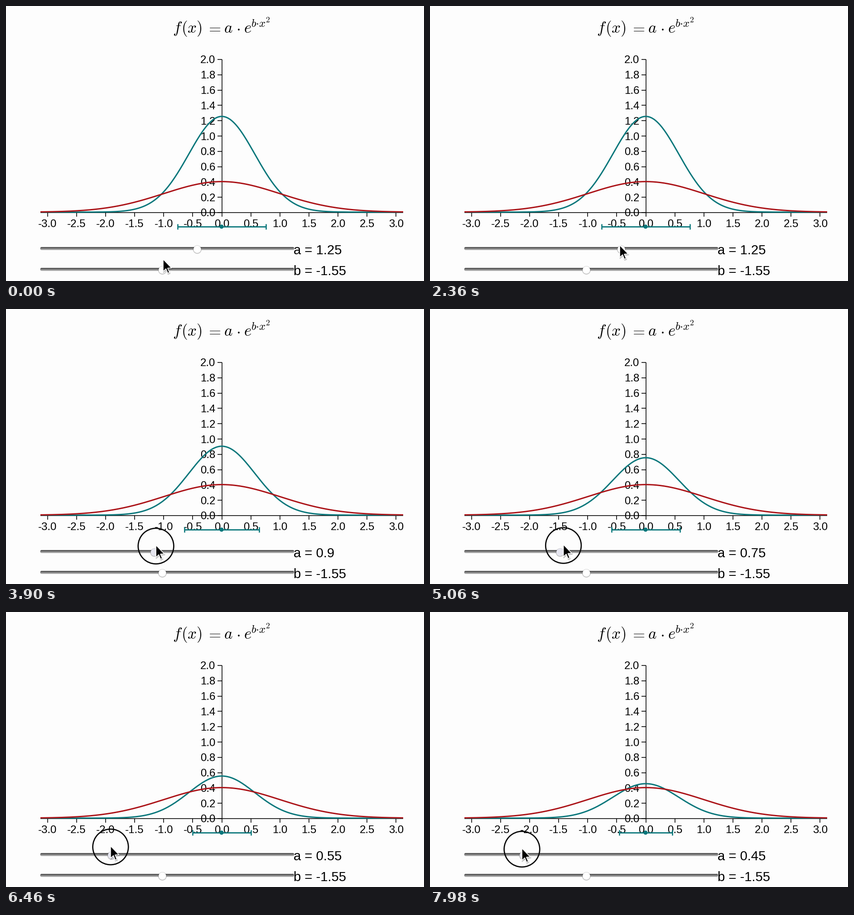
Write a matplotlib script that moves like this. It is 923x607 px and loops after 8 s.

```python
import numpy as np
import matplotlib.pyplot as plt
from matplotlib.animation import FuncAnimation
from matplotlib.patches import Circle, FancyBboxPatch, Polygon, Rectangle

W, H, DPI = 923, 607, 64
PX = 72 / DPI            # points per pixel
STEP, LOOP = 40, 8000
TEAL, RED, INK = "#0a777b", "#ab1318", "#000000"
X0, XU = 476.5, 128.33   # plot origin and pixels per unit
Y0, YU = 456, 169
LEFT, RIGHT = 76, 877
B = -1.55

plt.rcParams["font.family"] = "Liberation Sans"
plt.rcParams["mathtext.fontset"] = "cm"

fig = plt.figure(figsize=(W / DPI, H / DPI), dpi=DPI, facecolor="#fdfdfd")
ax = fig.add_axes([0, 0, 1, 1])
ax.set_xlim(0, W)
ax.set_ylim(H, 0)
ax.axis("off")


def line(x, y, width=1.6, color=INK, z=2):
    return ax.plot(x, y, color=color, lw=width * PX, zorder=z,
                   solid_capstyle="butt")[0]


def text(x, y, s, size, ha="left", z=1):
    return ax.text(x, y, s, fontsize=size * PX, ha=ha, va="baseline",
                   color=INK, zorder=z)


def curve_y(a, b):
    return Y0 - 1 - YU * a * np.exp(b * xs ** 2)


# Formula
for x, y, s, size, ha in [
        (368, 59, "f", 35, "left"), (387.2, 59, "(x)", 35, "left"),
        (457.8, 59, "=", 35, "center"), (481.2, 59, "a", 35, "left"),
        (512.4, 59, r"\cdot", 35, "center"), (525, 59, "e", 35, "left"),
        (541.3, 46, r"b{\cdot}x", 24.7, "left"), (573, 36, "2", 17.5, "left")]:
    text(x, y, f"${s}$", size, ha)

# Axes
plot_area = Rectangle((LEFT, 0), RIGHT - LEFT, H, transform=ax.transData)
line([LEFT, RIGHT], [Y0, Y0])
line([X0, X0], [Y0 - 2 * YU, Y0])
for k in range(-6, 7):
    x = X0 + k / 2 * XU
    line([x, x], [Y0, Y0 + 9])
    label = text(x, 488, f"{k / 2:.1f}", 24, "center")
    label.set_clip_path(plot_area)
for k in range(11):
    y = Y0 - k / 5 * YU
    line([X0 - 9.5, X0], [y, y])
    text(462.5, y + 8.5, f"{k / 5:.1f}", 24, "right")

# Curves and spread bar
px = np.linspace(LEFT, RIGHT, 401)
xs = (px - X0) / XU
bell = line(px, curve_y(1.25, B), 3, TEAL, 3)
line(px, curve_y(1 / np.sqrt(2 * np.pi), -0.5), 3, RED, 4)
bar = line([], [], 2.8, TEAL, 3)
caps = [line([], [], 2.6, TEAL, 3) for _ in range(2)]
ax.add_patch(Circle((X0 - 0.5, 487), 4.6, color=TEAL, lw=0, zorder=4))


# Sliders
def track(y):
    body = FancyBboxPatch((79, y), 554, 0.01, fc="none", ec="none",
                          boxstyle="round,pad=3.4,rounding_size=3.4")
    ax.add_patch(body)
    shade = ax.imshow(np.linspace(0.28, 0.74, 16)[:, None], cmap="gray",
                      vmin=0, vmax=1, extent=(75, 637, y + 3.5, y - 3.5),
                      aspect="auto", interpolation="bilinear", zorder=5)
    shade.set_clip_path(body)


def thumb(x, y):
    parts = [Circle((x, y + 0.8), 9.6, fc="#000000", alpha=0.10, lw=0, zorder=6),
             Circle((x, y + 0.3), 8.9, fc="#000000", alpha=0.25, lw=0, zorder=6),
             Circle((x, y), 8.3, fc="#ffffff", lw=0, zorder=7)]
    for p in parts:
        ax.add_patch(p)
    return parts


def thumb_x(a):
    return 84.5 + 270.3 * a


track(535.3)
track(581.3)
thumb_a = thumb(thumb_x(1.25), 537)
thumb(345.3, 582.7)
text_a = text(635.3, 547.5, "", 29.3, z=8)
text(635.3, 593.5, f"b = {B:g}", 29.3, z=8)
ax.set_xlim(0, W)
ax.set_ylim(H, 0)

# Pointer
ARROW = 1.68 * np.array([(0, 0), (0, 16), (3.7, 12.5), (6.1, 18.3), (8.3, 17.4),
                         (5.9, 11.7), (11, 11.4)])
shadow = Polygon(ARROW, fc="#000000", ec="#000000", lw=3 * PX, alpha=0.16,
                 joinstyle="round", zorder=10)
arrow = Polygon(ARROW, fc="#000000", ec="#ffffff", lw=1.6 * PX,
                joinstyle="round", zorder=11)
ring = Circle((0, 0), 39.3, fill=False, ec="#080808", lw=2.7 * PX, zorder=9)
for p in (shadow, arrow, ring):
    ax.add_patch(p)

# Pointer path: time, x, y
PATH = np.array([(500, 347, 559), (1450, 419, 528), (2480, 419, 528),
                 (3200, 368, 531), (3900, 330, 521), (5060, 294, 520),
                 (6460, 230, 516.5), (7440, 203, 521.5)])
PRESS = 2440


def pointer(t):
    if t < 1450:
        u = np.clip((t - 500) / 950, 0, 1)
        u = u * u * (3 - 2 * u)
        return PATH[0, 1:] + u * (PATH[1, 1:] - PATH[0, 1:])
    return np.array([np.interp(t, PATH[:, 0], PATH[:, k]) for k in (1, 2)])


def draw(i):
    t = i * STEP
    tip = pointer(t)
    pressed = t >= PRESS
    a = 1.25
    if pressed:
        a = min(a, round((tip[0] - 86) / 270.3 * 20) / 20)

    bell.set_ydata(curve_y(a, B))
    sd = np.sqrt(a * np.sqrt(np.pi / -B) / (-2 * B)) * XU
    bar.set_data([X0 - sd, X0 + sd], [487, 487])
    for cap, x in zip(caps, (X0 - sd, X0 + sd)):
        cap.set_data([x, x], [480.8, 493.2])

    for p in thumb_a:
        p.center = (thumb_x(a), p.center[1])
    thumb_a[-1].set_facecolor("#e6e6f0" if pressed else "#ffffff")
    text_a.set_text(f"a = {a:g}")

    arrow.set_xy(ARROW + tip)
    shadow.set_xy(ARROW + tip + (0.8, 2))
    ring.center = (tip[0], tip[1] + 2)
    ring.set_visible(pressed)
    return []


anim = FuncAnimation(fig, draw, frames=LOOP // STEP, interval=STEP,
                     init_func=lambda: draw(0), repeat=True, repeat_delay=0)
plt.show()
```
